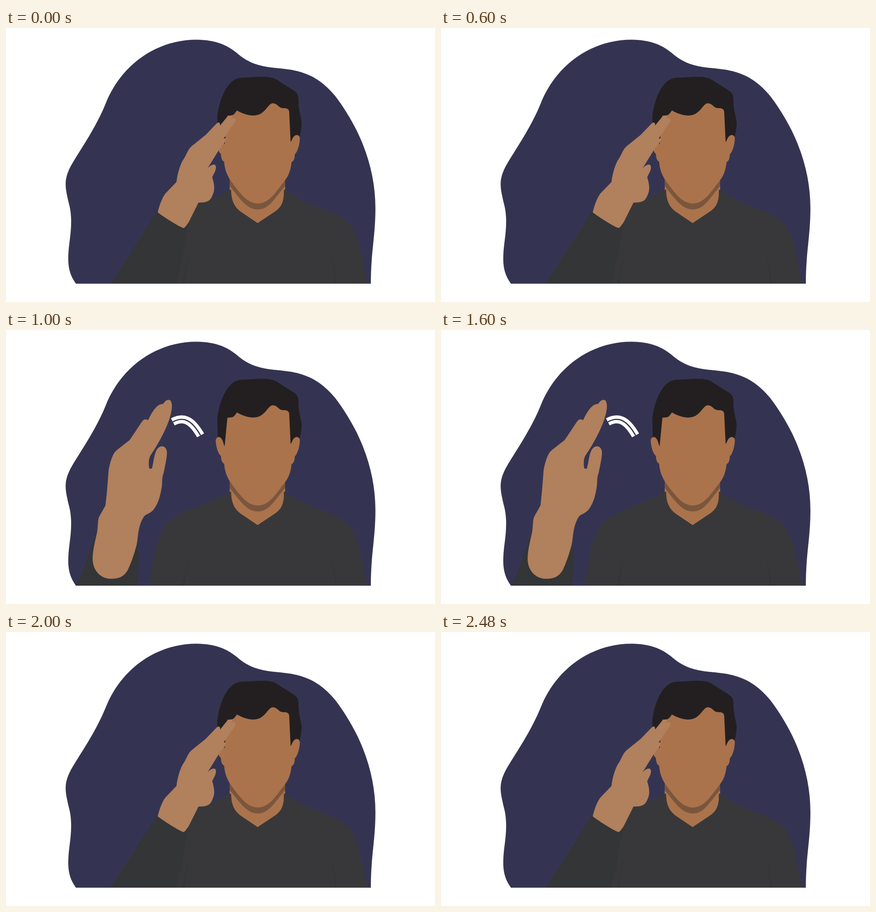
Animation of 936 by 598 pixels, one loop 2.8 s. Source, as an HTML page:

```html
<!DOCTYPE html>
<html lang="en">
<head>
<meta charset="utf-8">
<title>Salute</title>
<style>
  html, body { margin: 0; width: 100%; height: 100%; overflow: hidden; background: #fff; }
  svg { display: block; width: 100%; height: 100%; }
  .backdrop { fill: #343452; }
  .hair { fill: #231f20; }
  .skin { fill: #aa734c; }
  .shade { fill: #7a563d; }
  .shirt { fill: #38383a; }
  .fold { fill: #343537; }
  .sleeve { fill: #333537; }
  .hand { fill: #b1805d; }
  .swoosh { fill: none; stroke: #fff; stroke-width: 17.5; }
  .gap { fill: none; stroke: #343452; stroke-width: 2.6; }
</style>
</head>
<body>
<svg viewBox="0 0 936 598">
  <path class="backdrop" d="M152.500 558C138 538 135 519 136 496C137 468 143 449 142 415C141 391 137 385 134 369C128 343 128 327 141 302C158 271 193 224 217 166C251 79 330 25 417 25.500C455 26 481 36 503 54C527 75 549 83 586 87C626 91 673 93 718 148C777 226 806 310 806 393C806 455 796 490 796 558Z"/>

  <!-- Head and neck -->
  <path class="hair" d="M462 237C462 222 461 207 461 194C463 171 472 143 483 128C491 117 500 109 515 108.500C535 108 548 106 565 106.500C577 107 584 109 591 113L627 136C635 141 637 145 638 153C638 180 642 185 645 205C645 218 643 228 640 241L621 255H477Z"/>
  <path class="skin" d="M488 325H609V353H606.500C607 378 602 390 588 400L549 426L512 401C497 390 491 375 491 353H488Z"/>
  <path class="shade" d="M488 330H609V345C586 371 575 396 549 396C525 396 511 373 488 345Z"/>
  <path class="skin" d="M483 191.500L493 190.500C499 189 501 183 504 180C518 188 530 191 540 191C563 191 569 170 579 165C584 163 590 166 595 171C602 178 610 172 616 178Q618 180 618 186L621 249C625 244 625 237 632 234C637 232 642 236 641 243C640 259 635 271 630 276C630 285 628 290 623 293C621 312 616 323 609 332C589 357 575 383 549 383C526 383 510 360 488 330C481 318 477 307 476 292C471 289 469 283 469 275C463 270 459 258 457.500 243C457 236 463 231 468 235C474 240 474 248 477 254Z"/>

  <!-- Shirt -->
  <path class="shirt" d="M313 558C320 504 330 455 348 427C366 402 411 389 440 377C460 369 473 361 488 353H491C491 375 497 390 512 401L549 426L588 400C602 390 607 378 606.500 353H609C624 364 641 375 663 384C697 397 735 410 752 431C771 462 778 509 788 558Z"/>
  <path class="fold" d="M399.500 486C395 510 394 535 389 558H384C390 535 395 510 399.500 486ZM708.500 486C714 510 718 535 722 558H718C716 535 713 510 708.500 486Z"/>

  <g id="salute">
    <path class="sleeve" d="M228 558L331 398L387 434L400 421C389 465 385 510 371 558Z"/>
    <path class="hand" d="M331 402C335 387 340 371 348 361L372 336C374 318 379 302 385 290C394 278 395 267 405 258L436 233L459 209C464 204 468 206 467 213L484 192L495 191L491 198C496 195 501 197 501 201C499 209 491 215 487 224L475 241L479 241C481 244 479 248 475 252L464 267L440 306C448 298 456 295 458 302C459 312 452 319 450 326C455 342 456 354 451 364C446 378 439 381 420 381L399 423C396 428 391 435 388 436.500C382 437 341 410 333 404Z"/>
  </g>

  <g id="wave">
    <path class="sleeve" d="M153 558C171 524 184 476 198 441L285 468C291 487 290 505 288 530L286 558Z"/>
    <path class="hand" d="M189 500C189 480 195 459 199 440C201 425 200 417 203 408L217 383C221 350 222 329 224 305C228 285 233 269 242 262L270 240L296 201C301 194 305 194 310 197C315 186 323 171 333 164C338 161 343 162 344 160C349 152 355 151 359 154C366 165 359 185 356 196C346 224 330 252 317 271C311 279 311 290 312 300C313 304 318 304 319 300C322 288 323 272 329 261C336 250 349 252 351 265C352 278 346 300 344 312C339 323 342 336 339 347C335 372 328 384 322 392C313 402 306 401 301 407C287 429 289 451 285 469C280 488 273 509 265 525C256 540 244 543 228 543C203 542 189 521 189 500Z"/>
    <path class="swoosh" d="M364 200.500C386 189 404 194 424.500 230"/>
    <path class="gap" d="M364 200.500C386 189 404 194 424.500 230"/>
  </g>
</svg>
<script>
  const LOOP = 2800, WAVE_START = 1000, WAVE_END = 2000;
  const salute = document.getElementById("salute");
  const wave = document.getElementById("wave");
  const show = (part, on) => part.setAttribute("visibility", on ? "visible" : "hidden");

  function draw() {
    const t = performance.now() % LOOP;
    const waving = t >= WAVE_START && t < WAVE_END;
    show(salute, !waving);
    show(wave, waving);
    requestAnimationFrame(draw);
  }
  draw();
</script>
</body>
</html>
```
